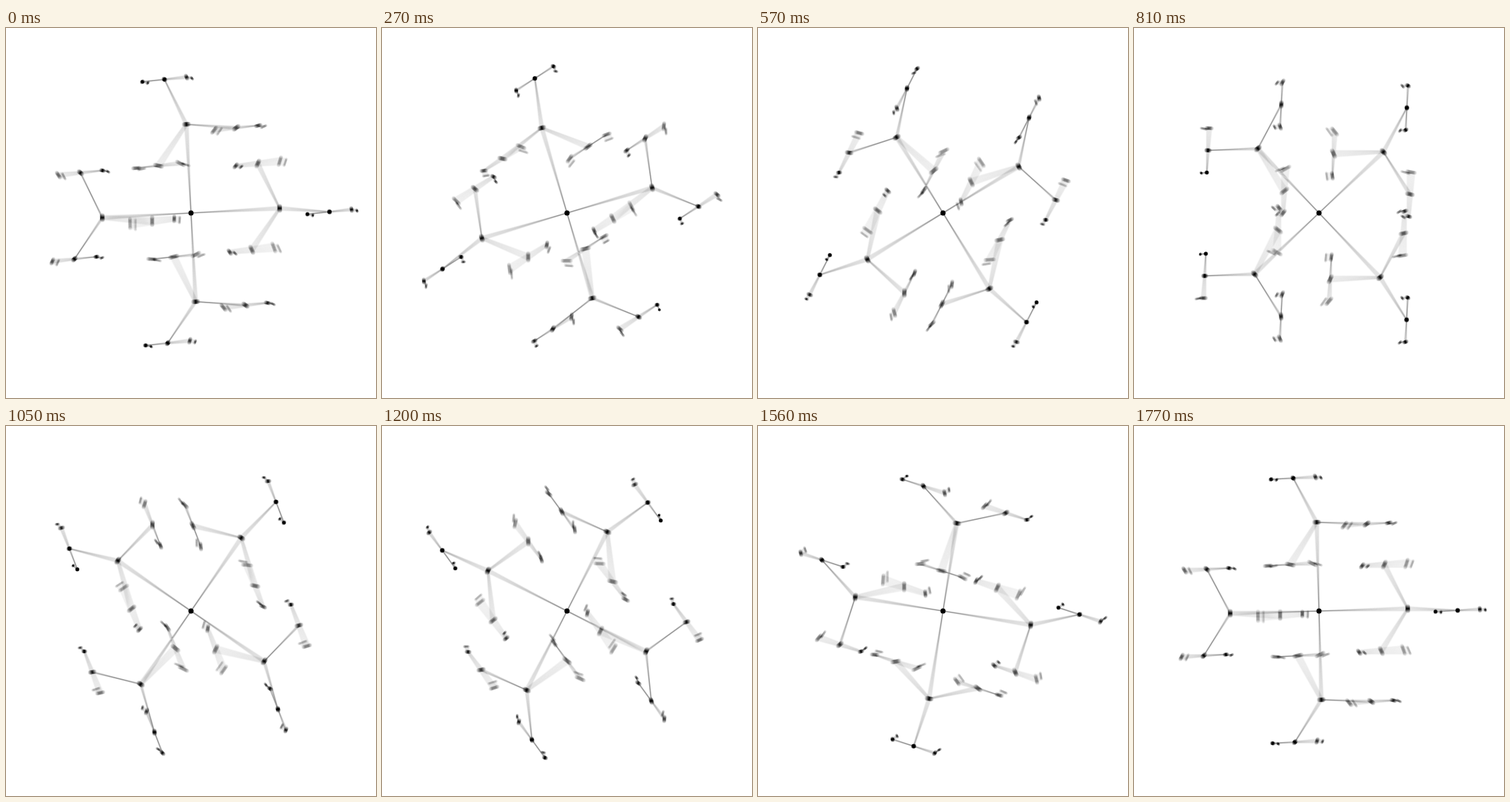
An HTML page with a canvas that plays this animation: 500x500 px, repeating every 1800 ms.

```html
<!DOCTYPE html>
<html lang="en">
<head>
<meta charset="utf-8">
<title>Turning tree</title>
<style>
  html, body { margin: 0; width: 100%; height: 100%; overflow: hidden; background: #fff; }
  canvas { display: block; width: 500px; height: 500px; }
</style>
</head>
<body>
<canvas id="stage" width="500" height="500"></canvas>
<script>
const SIZE = 500, STEP = 30, STEPS = 60;
const SAMPLES = 15, SHUTTER = 2;        // motion blur, shutter in steps
const DOT = [1.8, 2.6, 3, 3.3, 3.5];    // dot radius by number of children
const LINE = 'rgb(96,96,96)', LINE_WIDTH = 1.6;

const ctx = document.getElementById('stage').getContext('2d');
const layer = document.createElement('canvas');
layer.width = layer.height = SIZE;
const pen = layer.getContext('2d');

// Each node has n evenly spaced children; levels turn in alternating directions.
function visit(x, y, n, phase, edge, node) {
  const reach = 7.5 * n * n;
  const turn = (n % 2 ? 1 : -1) * phase;
  for (let i = 0; i < n; i++) {
    const a = (i + turn) * 2 * Math.PI / n;
    const cx = x + reach * Math.cos(a), cy = y + reach * Math.sin(a);
    edge(x, y, cx, cy);
    visit(cx, cy, n - 1, phase, edge, node);
  }
  node(x, y, DOT[n]);
}

// One sharp exposure, white on black.
function expose(phase) {
  const lines = new Path2D(), dots = new Path2D();
  visit(SIZE / 2, SIZE / 2, 4, phase,
    (x1, y1, x2, y2) => { lines.moveTo(x1, y1); lines.lineTo(x2, y2); },
    (x, y, r) => { dots.moveTo(x + r, y); dots.arc(x, y, r, 0, 2 * Math.PI); });
  pen.fillStyle = '#000';
  pen.fillRect(0, 0, SIZE, SIZE);
  pen.strokeStyle = LINE;
  pen.lineWidth = LINE_WIDTH;
  pen.stroke(lines);
  pen.fillStyle = '#fff';
  pen.fill(dots);
}

function fill(mode, color) {
  ctx.globalCompositeOperation = mode;
  ctx.globalAlpha = 1;
  ctx.fillStyle = color;
  ctx.fillRect(0, 0, SIZE, SIZE);
}

// Sum the exposures, then invert to black on white.
function draw(step) {
  fill('source-over', '#000');
  for (let i = 0; i < SAMPLES; i++) {
    expose((step + 1 + SHUTTER * (i + 0.5) / SAMPLES) / STEPS);
    ctx.globalCompositeOperation = 'lighter';
    ctx.globalAlpha = 1 / SAMPLES;
    ctx.drawImage(layer, 0, 0);
  }
  fill('difference', '#fff');
}

const start = performance.now();
let shown = -1;

function tick() {
  const step = Math.floor((performance.now() - start) / STEP) % STEPS;
  if (step !== shown) draw(shown = step);
  requestAnimationFrame(tick);
}
tick();
</script>
</body>
</html>
```
